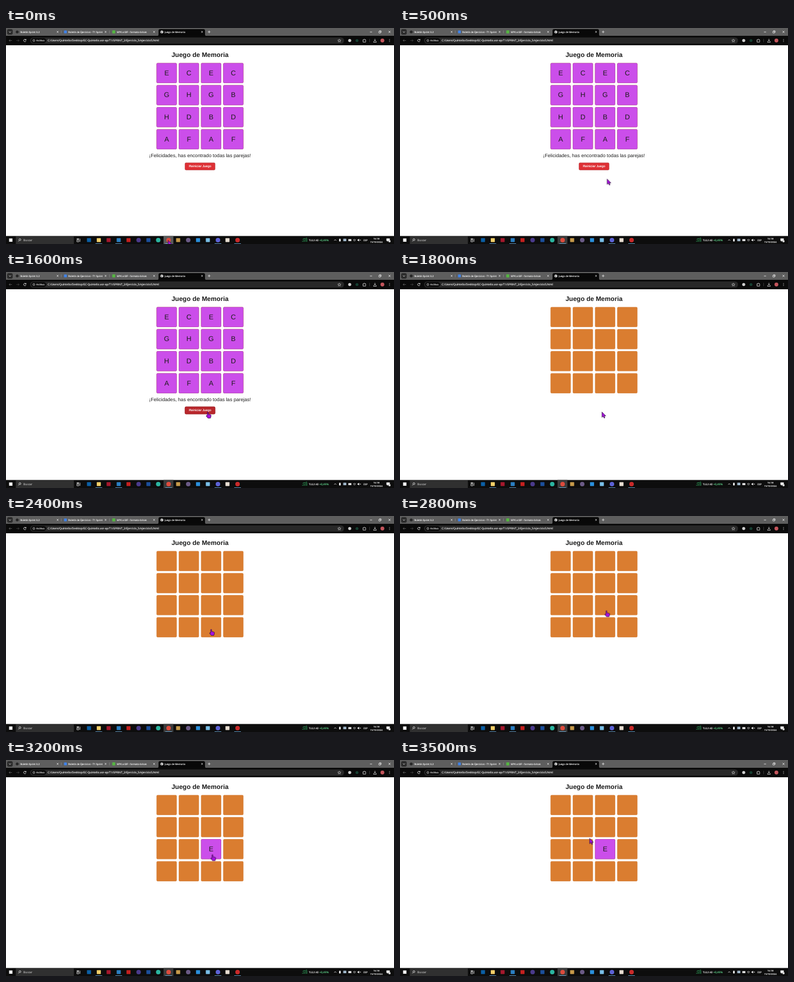
Animation of 692x388 px, one loop 3.6 s. Source, as an HTML page:

```html
<!DOCTYPE html>
<html lang="es">
<head>
<meta charset="utf-8">
<title>Juego de Memoria</title>
<style>
  html, body { margin: 0; width: 100%; height: 100%; overflow: hidden; background: #fff; }
  svg { text-rendering: geometricPrecision; }
  #stage { display: block; width: 100%; height: 100%; }
  .page { font-family: "Liberation Sans", Arial, sans-serif; fill: #1c1c1c; text-anchor: middle; }
  .ui { font-family: "Open Sans", "Noto Sans", sans-serif; fill: #f4f4f4; color: #f8f8f8; }
  .ui text { fill: currentColor; stroke: currentColor; stroke-width: .14; }
  .line { fill: none; stroke: #f0f0f0; stroke-width: .8; }

  .won, .hover, .flipped, .arrow, .hand, .cursor, .launch {
    animation: 3600ms step-end infinite;
  }
  .won { animation-name: won; }
  .hover { animation-name: hover; }
  .flipped { animation-name: flipped; }
  .arrow { animation-name: arrow; }
  .hand { animation-name: hand; }
  .cursor { animation-name: move; }
  .launch { animation-name: launch; }

  @keyframes won { 0% { opacity: 1 } 49.99%, 100% { opacity: 0 } }
  @keyframes hover { 0% { opacity: 0 } 25%, 100% { opacity: 1 } }
  @keyframes flipped { 0% { opacity: 0 } 83.33%, 100% { opacity: 1 } }
  @keyframes launch { 0% { fill: #5a5a5a } 2.77%, 100% { fill: #3b3b3b } }
  @keyframes arrow {
    0%, 49.99%, 97.22%, 100% { opacity: 1 }
    25%, 66.66% { opacity: 0 }
  }
  @keyframes hand {
    0%, 49.99%, 97.22%, 100% { opacity: 0 }
    25%, 66.66% { opacity: 1 }
  }
  @keyframes move {
    0% { transform: translate(289px, 381px) }
    2.77% { transform: translate(302px, 375px) }
    5.55% { transform: translate(334px, 352px) }
    8.33% { transform: translate(362px, 322px) }
    11.11% { transform: translate(378px, 289px) }
    13.88% { transform: translate(369.2px, 270.8px) }
    16.66% { transform: translate(366px, 264.5px) }
    19.44% { transform: translate(364px, 259px) }
    22.22% { transform: translate(362px, 255.6px) }
    25% { transform: translate(361px, 253px) }
    27.77% { transform: translate(360.5px, 252px) }
    33.33% { transform: translate(360px, 251px) }
    58.33% { transform: translate(361px, 247px) }
    61.11% { transform: translate(362px, 236px) }
    63.88% { transform: translate(364px, 220px) }
    66.66% { transform: translate(366px, 203px) }
    69.44% { transform: translate(367px, 190px) }
    72.22% { transform: translate(368px, 181.8px) }
    75% { transform: translate(368px, 173px) }
    77.77% { transform: translate(368.3px, 169.4px) }
    91.66% { transform: translate(363px, 165px) }
    94.44% { transform: translate(350px, 152px) }
    97.22%, 100% { transform: translate(338px, 140.3px) }
  }
</style>
</head>
<body>
<svg id="stage" viewBox="0 0 692 388" preserveAspectRatio="none"></svg>
<script>
  const rect = (x, y, w, h, fill, r = 0, extra = "") =>
    `<rect x="${x}" y="${y}" width="${w}" height="${h}" rx="${r}" fill="${fill}" ${extra}/>`;
  const dot = (x, y, r, fill, extra = "") =>
    `<circle cx="${x}" cy="${y}" r="${r}" fill="${fill}" ${extra}/>`;
  const line = (d, extra = "") => `<path class="line" d="${d}" ${extra}/>`;
  const text = (x, y, size, str, extra = "") =>
    `<text x="${x}" y="${y}" font-size="${size}" ${extra}>${str}</text>`;
  const group = (cls, ...parts) => `<g class="${cls}">${parts.join("")}</g>`;
  const cross = (x, y, r) =>
    line(`M${x - r} ${y - r}l${2 * r} ${2 * r}m0 ${-2 * r}l${-2 * r} ${2 * r}`);

  function tab(x, label) {
    return `<svg x="${x}" y="0" width="61.5" height="14">${text(0, 8.8, 4.3, label)}</svg>` +
      cross(x + 66.6, 7, 1.4);
  }

  function tabBar() {
    return group("ui",
      rect(0, 0, 692, 15, "#5e5e5e"),
      rect(2, 2, 10, 10, "#2c2c2c", 3),
      line("M5.3 6.3l1.8 1.8 1.8-1.8"),
      `<path d="M269 14.5q3 0 3-3V5q0-3 3-3h77q3 0 3 3v6.5q0 3 3 3z" fill="#080808"/>`,
      dot(20, 7, 2.6, "#262626"),
      rect(103.5, 4.5, 5, 5, "#3f83ea", .6),
      rect(189.5, 4.3, 5.4, 5.4, "#55b542", .6),
      dot(278, 7, 2.6, "#e9e9e9"),
      line("M276 6l1.5 1 .5 2M278.5 5l1 1.5", 'style="stroke:#333"'),
      tab(25.5, "Boletín Sprint 3.2"),
      tab(111, "Boletín de Ejercicios - T1 Sprint"),
      tab(197.5, "MP4 a GIF - formato-brisas"),
      tab(283, "Juego de Memoria"),
      line("M98.5 4.5v5M184.5 4.5v5", 'style="stroke:#888"'),
      line("M360 7h4.6M362.3 4.7v4.6"),
      line("M649 7.2h4"),
      line("M665 6h3v3h-3zM666 6v-1h3v3h-1"),
      cross(684, 7, 1.7));
  }

  function toolBar() {
    return group("ui",
      rect(0, 14, 692, 17, "#0a0a0a"),
      line("M10.5 22.5h-5m2-2l-2 2 2 2", 'style="stroke:#666"'),
      line("M18.5 22.5h5m-2-2l2 2-2 2", 'style="stroke:#444"'),
      line("M35.5 21.3a2.2 2.2 0 1 0 .2 2M35.8 19.8v1.9h-1.9"),
      rect(43, 17, 560, 11, "#282828", 5.5),
      rect(45, 18.3, 26.5, 8.4, "#0a0a0a", 4.2),
      dot(49.7, 22.5, 1.9, "none", 'class="line" style="stroke-width:.6"'),
      line("M49.7 22.2v1.3M49.7 21.2v.5", 'style="stroke-width:.6"'),
      text(54, 24.1, 4.3, "Archivo"),
      text(74.3, 24.2, 4.86,
        "C:/Users/Quintelio/Desktop/EC-Quintelio.vor-ap/T1/SPRINT_2/Ejercicio_5/ejercicio5.html"),
      line("M594.5 19.9l.8 1.8 2 .2-1.5 1.3.4 2-1.7-1-1.7 1 .4-2-1.5-1.3 2-.2z",
        'style="stroke-width:.6"'),
      dot(613, 22.5, 2.7, "#cfcfcf"),
      dot(626, 22.5, 2.6, "#153f31"),
      line("M636.8 21h1.4a.9 .9 0 0 1 1.8 0h1.4v1.4a.9 .9 0 0 1 0 1.6v1.3h-4.6z"),
      line("M648.5 19.5v6", 'style="stroke:#444"'),
      line("M658 19.5v4m-1.7-1.7l1.7 1.7 1.7-1.7M655.5 24v1.5h5v-1.5"),
      dot(671.3, 22.5, 3.4, "#c4555c"),
      [20.5, 22.5, 24.5].map(y => dot(684, y, .6, "#f0f0f0")).join(""));
  }

  // Centre x, main colour, shape
  const apps = [
    [148, "#0b5fa5", "s"], [165.5, "#f3cf68", "s"], [183, "#a5182d", "s"],
    [201, "#2a7fc4", "s"], [218.5, "#c4201f", "s"], [236.5, "#4a3a8c", "c"],
    [254, "#1b4f9c", "s"], [271.5, "#2bb5a0", "c"], [290, "#de4b3d", "c"],
    [307, "#c79a4a", "s"], [325, "#6a5a86", "c"], [342.5, "#2a8fdc", "s"],
    [360, "#79bfe8", "s"], [378, "#5c62d6", "c"], [395, "#e8ded2", "s"],
    [413, "#c92a2a", "c"]
  ];

  function taskBar() {
    const icon = ([x, color, kind]) => kind === "c"
      ? dot(x, 381, 4, color)
      : rect(x - 3.6, 377.4, 7.2, 7.2, color, .8);
    const running = [165.5, 201, 290, 378, 413];
    return group("ui",
      rect(0, 373.6, 692, 14.4, "#0d0d0d"),
      rect(5.5, 378, 6, 6, "#f2f2f2"),
      rect(17.5, 374.3, 103.5, 13.7, "#303030"),
      dot(24.8, 380.2, 1.7, "none", 'class="line"'),
      line("M23.6 381.5l-1.7 1.9"),
      text(31, 382.8, 5, "Buscar", 'color="#b5b5b5"'),
      line("M126.5 378.5h3.5v1.3h-3.5zM126.5 381h3.5v3h-3.5zM132 378.5v5.5"),
      `<rect class="launch" x="281" y="373.6" width="17.5" height="14.4"/>`,
      apps.map(icon).join(""),
      running.map(x => rect(x - 6, 387.2, 12, .8, "#76b9ed")).join(""),
      line("M529 384v-2M531.5 384v-3.5M534 384v-4.5M536.5 384v-6M529 380l3-2 1.5 1 3-2.5",
        'style="stroke:#35c26b"'),
      text(540, 382.6, 4.6, "TULX 40"),
      text(559, 382.6, 4.9, "+0,49%", 'color="#5fd08a"'),
      line("M585.2 382l2-2 2 2"),
      rect(594, 378.5, 3, 5, "#e8e8e8", 1.3),
      rect(601.5, 378.5, 5.5, 4.5, "#9fb6c9", .6),
      rect(610.5, 379.3, 5.5, 3.4, "#e8e8e8", .5),
      line("M619 381a3.5 3.5 0 0 1 5 0M620.2 382.5a2 2 0 0 1 2.6 0"),
      `<path d="M627 380h1.2l1.6-1.5v5l-1.6-1.5h-1.2z"/>`,
      line("M630.8 380l2 2m0-2l-2 2", 'style="stroke-width:.6"'),
      text(637.5, 382.5, 4.3, "ESP"),
      text(660.5, 379.7, 4.2, "16:18", 'text-anchor="middle"'),
      text(660.5, 386.2, 4.2, "15/10/2024", 'text-anchor="middle"'),
      `<path d="M678.5 378h6v4.5h-3l-1.5 1.5v-1.500h-1.500z"/>`,
      dot(684, 383, 2, "#d8d8d8"));
  }

  const PITCH = 39.64, SIZE = 36;
  const letters = "ECECGHGBHDBDAFAF";

  function card(i, letter) {
    const x = 268.5 + i % 4 * PITCH, y = 62.9 + Math.floor(i / 4) * PITCH;
    const [fill, edge] = letter ? ["#cb4eea", "#b344d2"] : ["#da7d30", "#d2772d"];
    const face = rect(x + .35, y + .35, SIZE - .7, SIZE - .7, fill, 1.5,
      `stroke="${edge}" stroke-width=".7"`);
    return face + (letter ? text(x + SIZE / 2, y + 21.9, 12.3, letter) : "");
  }

  function button(fill, edge) {
    return rect(319.3, 242.2, 53.5, 12.8, fill, 1.8, `stroke="${edge}" stroke-width=".7"`) +
      text(346, 250.4, 5.77, "Reiniciar Juego", 'fill="#fff" stroke="#fff" stroke-width=".12"');
  }

  function game() {
    const all = [...letters];
    return group("page",
      text(346, 52.1, 11.58, "Juego de Memoria", 'font-weight="bold"'),
      all.map((_, i) => card(i)).join(""),
      group("won",
        all.map((c, i) => card(i, c)).join(""),
        text(346, 232.4, 8.67, "¡Felicidades, has encontrado todas las parejas!"),
        button("#de3035", "#b3262b"),
        group("hover", button("#b9272c", "#962024"))),
      group("flipped", card(10, "E")));
  }

  function cursor() {
    const style = 'fill="#a512de" stroke="#1d0628" stroke-width=".7" stroke-linejoin="round"';
    return group("cursor",
      group("arrow", `<path d="M.2 .5v9.6l2.2-2 1.6 3.3 1.5-.7-1.5-3.2h3z" ${style}/>`),
      group("hand", `<path d="M-1 1.2q.9-1.3 1.8 0v3.3l3.9 .9q1.2.3 1.1 1.5
        l-.5 2.7-.7 1.9h-4.6l-2.9-3.7q-.4-1.3 1.1-1l.8.6z" ${style}/>`));
  }

  document.getElementById("stage").innerHTML =
    rect(0, 0, 692, 388, "#fff") + tabBar() + toolBar() + game() + taskBar() + cursor();
</script>
</body>
</html>
```
